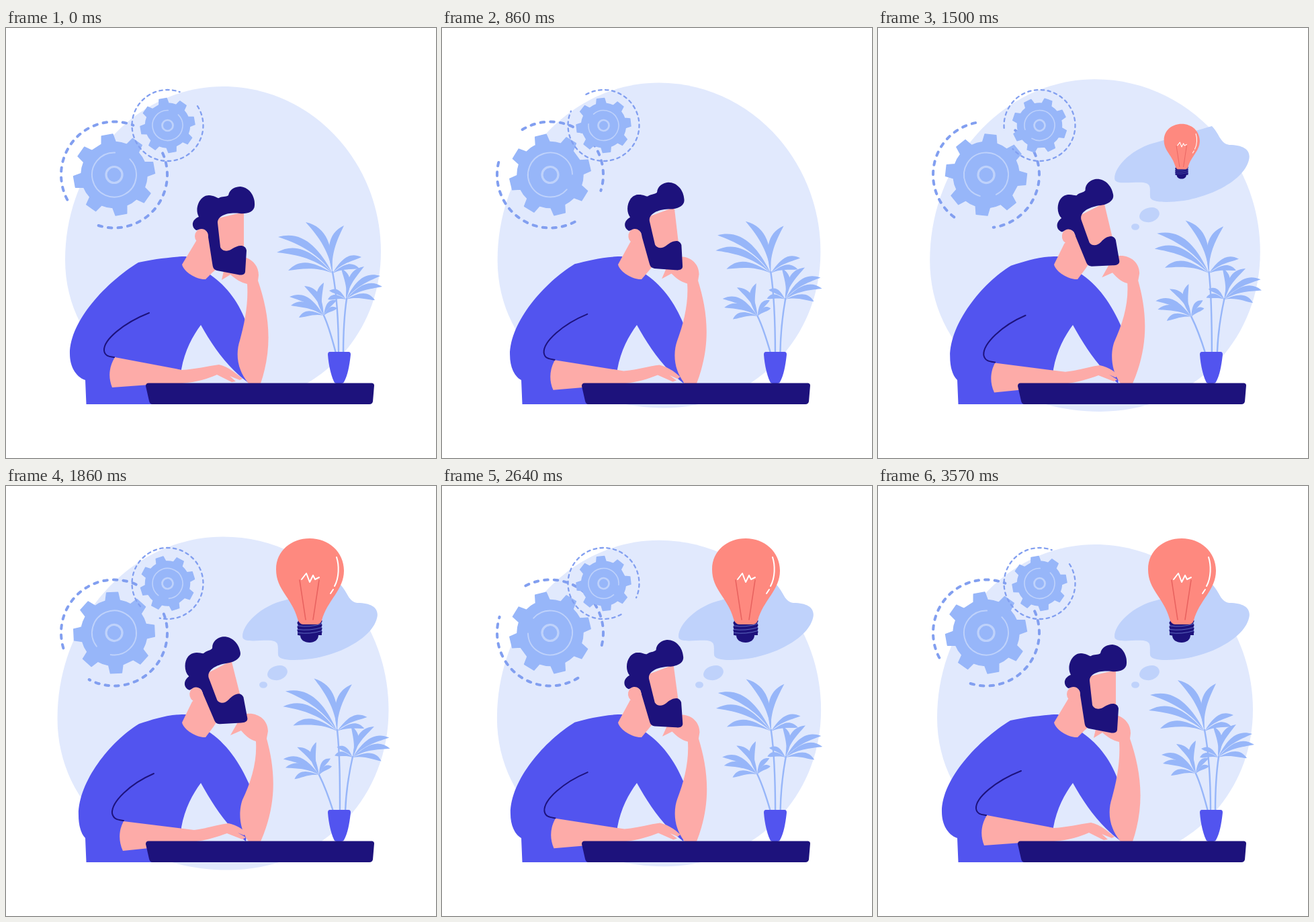
An HTML page for the animation above (3640 ms loop, 640 px wide and 640 px high).

```html
<!DOCTYPE html>
<html lang="en">
<head>
<meta charset="utf-8">
<title>Thinking man</title>
<style>
  html, body { margin: 0; width: 100%; height: 100%; overflow: hidden; background: #fff; }
  svg { display: block; width: 100vw; height: 100vh; }
  .pale { fill: #e1e9fd; }
  .cloud { fill: #bfd2fb; }
  .leaf { fill: #97b6f9; }
  .shirt { fill: #5254ef; }
  .skin { fill: #fdaba8; }
  .dark { fill: #1d127c; }
  .line { fill: none; stroke-linecap: round; stroke-linejoin: round; }
  .dash { stroke: #829ff0; }
  .light { stroke: #bfd2fb; }
  .white { stroke: #fff; stroke-width: 2; }
</style>
</head>
<body>
<svg viewBox="0 0 640 640">
  <path id="backdrop" class="pale" d="M88 345C88 203 194 87 323 87C453 87 558 198 558 333C558 460 460 560 330 560C195 560 88 470 88 345Z"/>
  <g id="gears"></g>

  <g id="thought">
    <ellipse id="dotSmall" class="cloud" cx="383" cy="296" rx="6" ry="4.8"/>
    <path id="dotLarge" class="cloud" d="M389 280C390 272 399 267 408 267C416 267 421 274 418 280C415 286 407 290 400 289C393 288 389 285 389 280Z"/>
    <path id="cloud" class="cloud" d="M352 224C352 205 380 178 415 170L497 146C509 158 509 172 523 174C546 174 556 183 552 197C545 225 500 250 455 257C425 261 405 259 405 251C404 240 408 232 395 230C375 229 352 234 352 224Z"/>
    <g id="bulb">
      <path class="dark" d="M435 198H469L470 222H465C465 229 459 233 452 233C444 233 438 229 438 222H434Z"/>
      <path class="line" stroke="#1d127c" stroke-width="5" d="M436 204L468 201M436 210L468 207M436 215L468 212M437 220L468 217"/>
      <path class="line" stroke="#6f7fd0" stroke-width=".8" d="M434 208Q452 211 470 205M434 213.500Q452 216 470 210.500M435 218.500Q452 221 470 215.500"/>
      <path fill="#fe897f" d="M452 78C480 78 503 98 503 126C503 155 478 170 470 200Q468 206 462 206H442Q437 206 434 198C425 165 402 155 402 124C402 96 425 78 452 78Z"/>
      <path class="line" stroke="#e8625f" stroke-width="1.6" d="M437 140L446 199M466 140L457 199"/>
      <path class="line white" d="M440 139L447 130L452 143L457 133L460 139L466 136M492 106C496 118 496 136 489 149M487 154L483 160"/>
    </g>
  </g>

  <g id="plant" class="leaf"></g>
  <path class="shirt" d="M482 482H510Q513 482 513 486C511 505 508 518 503 527Q502 529 499 529H492Q489 529 488 526C483 515 480 500 479 486Q479 482 482 482Z"/>

  <g id="man"></g>
  <g id="head">
    <path class="skin" d="M312 284L354 274V335L318 340Z"/>
    <path class="dark" d="M283 301C276 297 275 286 287 281C280 269 288 249 302 249C310 249 315 254 317 253C322 250 327 252 331 249C333 239 342 236 349 236C362 237 371 250 370 264C370 274 358 277 348 276C332 274 315 278 315 290L319 326C322 333 330 333 336 329C345 323 356 321 358 331L356 363C355 368 350 368 345 367L314 361C308 359 308 356 307 350L300 305C296 298 288 300 283 301Z"/>
    <ellipse class="skin" cx="291" cy="310" rx="10" ry="11"/>
  </g>
  <path class="dark" d="M212 528.500H545Q548 529 548 532L546 556Q545 560 541 560H218Q214 560 213 555L208 533Q208 528.500 212 528.500Z"/>
</svg>
<script>
const FRAME = 1000 / 14, LAST = 50, LOOP = 3640;
const $ = id => document.getElementById(id);

function add(parent, tag, attrs) {
  const el = document.createElementNS('http://www.w3.org/2000/svg', tag);
  for (const key in attrs) el.setAttribute(key, attrs[key]);
  return parent.appendChild(el);
}

const polar = (r, deg) => {
  const a = deg * Math.PI / 180;
  return (r * Math.cos(a)).toFixed(2) + ' ' + (r * Math.sin(a)).toFixed(2);
};
const arc = (r, from, to) =>
  `M${polar(r, from)}A${r} ${r} 0 ${to - from > 180 ? 1 : 0} 1 ${polar(r, to)}`;

// Gears
function gearPath(inner, outer) {
  let d = '';
  for (let i = 0; i < 8; i++) {
    const a = i * 45 - 100;
    d += (i ? `A${inner} ${inner} 0 0 1 ` : 'M') + polar(inner, a - 12.5) +
      `L${polar(outer, a - 8)}L${polar(outer, a + 8)}L${polar(inner, a + 12.5)}`;
  }
  return d + 'Z';
}

function makeGear({ x, y, inner, outer, groove, hub, weight, ring, ringWeight, dash, dir }) {
  const spin = add(add($('gears'), 'g', { transform: `translate(${x} ${y})` }), 'g', {});
  add(spin, 'path', { class: 'leaf', d: gearPath(inner, outer), stroke: '#97b6f9', 'stroke-width': 1.5, 'stroke-linejoin': 'round' });
  add(spin, 'path', { class: 'line light', d: arc(groove, -45, 272), 'stroke-width': weight });
  add(spin, 'circle', { class: 'line light', r: hub, 'stroke-width': weight * 1.7 });
  add(spin, 'path', { class: 'line dash', d: ring, 'stroke-width': ringWeight, 'stroke-dasharray': dash });
  return turn => spin.setAttribute('transform', `rotate(${360 * turn * dir})`);
}

const gears = [
  makeGear({ x: 161, y: 218.5, inner: 49, outer: 60.5, groove: 33, hub: 12, weight: 1.9,
    ring: arc(79, 152, 291) + arc(79, -24, 108), ringWeight: 4, dash: '5.5 9.1', dir: 1 }),
  makeGear({ x: 240.5, y: 145, inner: 33, outer: 40.5, groove: 22.5, hub: 8, weight: 1.6,
    ring: arc(53, -33, 290), ringWeight: 2.3, dash: '4.5 5.4', dir: -1 })
];

// Shapes that blend between the leaning pose and the upright pose
const morphs = [];
const morph = (parent, attrs, from, to) =>
  morphs.push({ el: add(parent, 'path', attrs), from, to: to.match(/-?[\d.]+/g) });
const blend = (from, to, p) => {
  let i = 0;
  return from.replace(/-?[\d.]+/g, n => (+n + (to[i++] - n) * p).toFixed(2));
};

// Plant
function leaf(x, y) {
  const len = Math.hypot(x, y), nx = -y / len, ny = x / len;
  const bend = len * (x < 0 ? .18 : -.18), width = 5 + len * .06;
  const at = (k, off) => `${(x * k + nx * off).toFixed(1)} ${(y * k + ny * off).toFixed(1)} `;
  return `M0 0C${at(.4, bend + width * .3)}${at(.75, bend + width)}${x} ${y}` +
    `C${at(.75, bend - width)}${at(.4, bend - width * .3)}0 0`;
}

const stem = { class: 'line', stroke: '#97b6f9', 'stroke-width': 2.4 };
morph($('plant'), stem, 'M486 363C493 400 495 440 495 484', 'M493 363C497 400 497 440 497 484');
morph($('plant'), stem, 'M473 428C481 445 486 465 491 484', 'M466 430C475 448 481 465 487 484');
morph($('plant'), stem, 'M507 403C503 430 502 455 502 484', 'M516 403C510 430 506 455 505 484');

const clusters = [
  { from: [486, 365], to: [493, 365], turn: 4,
    tips: [[-40, -76], [17, -71], [-81, -54], [-83, -31], [-66, -4], [43, -24], [40, -7]] },
  { from: [473, 428], to: [466, 430], turn: -5,
    tips: [[-29, -44], [0, -49], [-51, -28], [-49, -15], [-37, 3], [19, -23], [20, -11]] },
  { from: [506, 404], to: [516, 404], turn: 6,
    tips: [[-7, -46], [27, -49], [51, -35], [54, -19], [43, 1], [-25, -13], [-27, 0]] }
];
for (const c of clusters) {
  c.el = add($('plant'), 'g', {});
  for (const [x, y] of c.tips) add(c.el, 'path', { d: leaf(x, y) });
}

// Man
const man = $('man');
morph(man, { class: 'shirt' },
  'M262 340C236 342 215 345 197 349C150 378 95 435 95 485C95 505 105 520 118 524L119.500 560L259 560L261 508C266 480 278 458 290 442C308 474 330 506 362 529L357 437C345 405 325 380 299 364L268 340Z',
  'M262 340C236 341 218 348 198 354C155 380 108 440 108 489C108 506 112 518 118 524L119.500 560L259 560L261 508C266 480 278 458 290 442C308 474 328 506 357 529L363 446C348 412 328 382 299 364L268 340Z');
morph(man, { class: 'skin' },
  'M162 490L262 509C282 508 300 503 317 501C330 504 340 512 352 522L348 524L333 518L342 526L336 527L314 516C300 522 285 527 262 529L213 531L158 535C152 520 153 505 162 490Z',
  'M175 499L280 512C298 510 315 504 331 502C340 504 350 508 357 516L354 520L345 516L357 523L352 526L329 517C315 522 300 527 277 530L213 539L174 543C167 528 168 512 175 499Z');
morph(man, { class: 'line', stroke: '#1d127c', 'stroke-width': 2 },
  'M213 424C175 439 145 464 146 480C147 489 155 489 161 490',
  'M220 428C185 443 157 470 158 487C160 497 168 497 175 498');
morph(man, { class: 'skin' },
  'M345 345L358 342C368 346 376 355 376 368L375 376C390 420 399 470 379 529L361 529C341 505 343 480 348 465C355 440 361 410 359 381C350 379 342 374 334 367L321 375L324 362Z',
  'M350 342L358 339C375 337 390 348 390 365L388 376C400 420 405 470 379 529L361 529C345 508 347 480 352 467C365 440 374 410 372 380C362 377 356 371 350 364L334 371L346 350Z');
morph(man, { class: 'skin' },
  'M262 352L283 317L302 304L313 359L307 364L297 374C285 375 265 364 262 352Z',
  'M262 352L277 321L294 308L316 347L309 358L297 374C285 375 265 364 262 352Z');

// Thought parts: pivot, start and duration in ms
const pops = [
  ['dotSmall', 383, 296, 980, 180],
  ['dotLarge', 404, 278, 1060, 210],
  ['cloud', 440, 215, 1220, 290],
  ['bulb', 452, 215, 1400, 320]
];

function scaleAbout(el, x, y, s) {
  el.setAttribute('transform', `translate(${x} ${y}) scale(${s}) translate(${-x} ${-y})`);
}

function draw(ms) {
  const frame = Math.min(LAST, Math.floor((ms + 4) / FRAME));
  const turn = frame / LAST, time = frame * FRAME;
  const p = (1 - Math.cos(2 * Math.PI * turn)) / 2;

  scaleAbout($('backdrop'), 323, 323, 1 + .049 * p);
  gears.forEach(spin => spin(turn));
  for (const m of morphs) m.el.setAttribute('d', blend(m.from, m.to, p));
  for (const { el, from, to, turn: sway } of clusters) {
    const [x, y] = from.map((v, i) => v + (to[i] - v) * p);
    el.setAttribute('transform', `translate(${x} ${y}) rotate(${sway * p})`);
  }
  $('head').setAttribute('transform', `rotate(${-14.3 * p} 289 341)`);
  for (const [id, x, y, start, span] of pops) {
    const k = Math.max(0, Math.min(1, (time - start) / span));
    $(id).style.display = k ? '' : 'none';
    scaleAbout($(id), x, y, 1 - (1 - k) ** 2);
  }
}

const begin = performance.now();
function tick() {
  draw((performance.now() - begin) % LOOP);
  requestAnimationFrame(tick);
}
tick();
</script>
</body>
</html>
```
